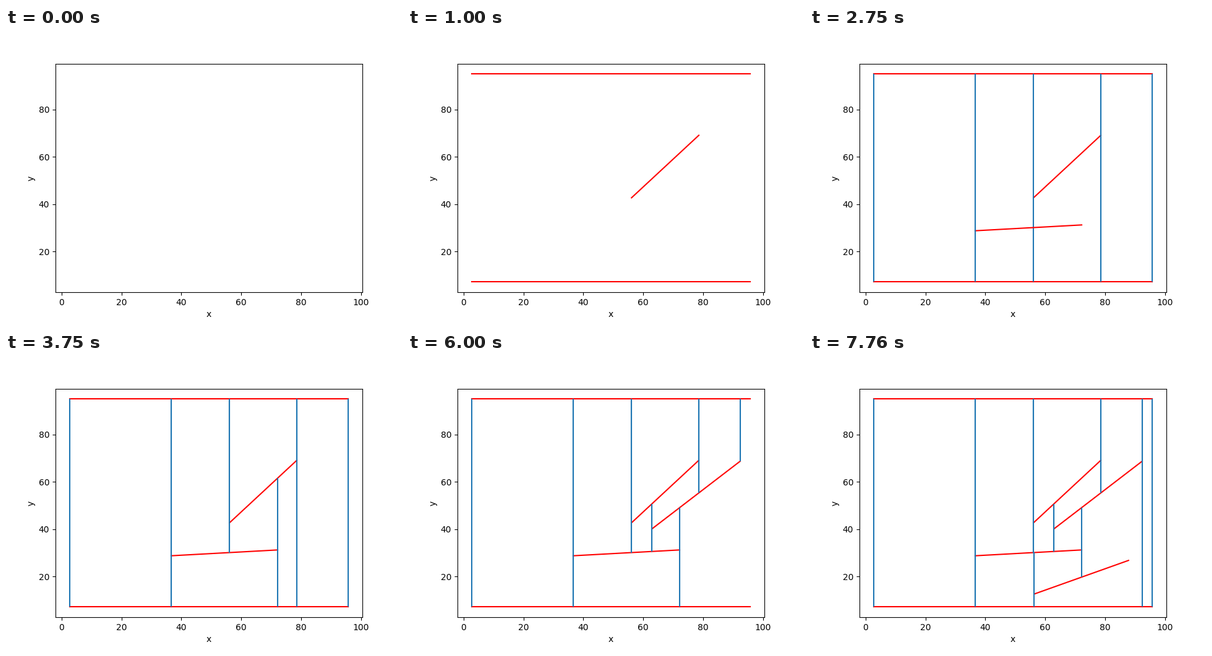
Animation of 640 by 480 pixels, one loop 8000 ms. Source, as a matplotlib script:

```python
import matplotlib.pyplot as plt
from matplotlib.animation import FuncAnimation

X0, X1 = 2.62, 95.85
Y0, Y1 = 7.22, 95.02
MARGIN = 0.05

# Segments: (left x, left y, right x, right y)
TOP = (X0, Y1, X1, Y1)
BOTTOM = (X0, Y0, X1, Y0)
S1 = (56.1, 42.75, 78.6, 69.15)
S2 = (36.6, 28.83, 72.2, 31.29)
S3 = (62.95, 40.2, 92.4, 68.75)
S4 = (56.29, 12.65, 87.86, 26.87)


def trap(left, right, upper, lower):
    return ("trap", left, right, upper, lower)


def seg(*lines):
    return ("seg", *lines)


def height(line, x):
    xa, ya, xb, yb = line
    return ya + (yb - ya) * (x - xa) / (xb - xa)


P1, Q1 = S1[0], S1[2]
P2, Q2 = S2[0], S2[2]
P3, Q3 = S3[0], S3[2]
P4 = S4[0]

whole = trap(X0, X1, TOP, BOTTOM)
left1 = trap(X0, P1, TOP, BOTTOM)
over1 = trap(P1, Q1, TOP, S1)
under1 = trap(P1, Q1, S1, BOTTOM)
right1 = trap(Q1, X1, TOP, BOTTOM)

left2 = trap(X0, P2, TOP, BOTTOM)
over2a = trap(P2, P1, TOP, S2)
over2b = trap(P1, Q2, S1, S2)
under2 = trap(P2, Q2, S2, BOTTOM)
right2 = trap(Q2, Q1, S1, BOTTOM)

left3 = trap(P1, P3, S1, S2)
over3a = trap(P3, Q1, S1, S3)
under3a = trap(P3, Q2, S3, S2)
over3b = trap(Q1, Q3, TOP, S3)
under3b = trap(Q2, Q3, S3, BOTTOM)
right3 = trap(Q3, X1, TOP, BOTTOM)

left4 = trap(P2, P4, S2, BOTTOM)
over4 = trap(P4, Q2, S2, S4)

# One step per frame; a trapezoid listed a second time is taken away.
STEPS = [
    seg(TOP, BOTTOM), whole,
    seg(S1), whole, left1, over1, under1, right1,
    seg(S2), left1, left2, over2a, under1, over2b, under2, right2,
    seg(S3), over2b, left3, over3a, right2, under3a, right1,
    over3b, under3b, right3,
    seg(S4), under2, left4, over4, under3b,
]

fig, ax = plt.subplots(figsize=(6.4, 4.8), dpi=100)
mx, my = MARGIN * (X1 - X0), MARGIN * (Y1 - Y0)
ax.set_xlim(X0 - mx, X1 + mx)
ax.set_ylim(Y0 - my, Y1 + my)
ax.set_xlabel("x")
ax.set_ylabel("y")
artists = []


def visible(n):
    shown = []
    for item in STEPS[:n]:
        if item in shown:
            shown.remove(item)
        else:
            shown.append(item)
    return shown


def draw(n):
    while artists:
        artists.pop().remove()
    for kind, *parts in visible(n):
        if kind == "seg":
            for xa, ya, xb, yb in parts:
                artists.extend(ax.plot([xa, xb], [ya, yb], color="red"))
        else:
            left, right, upper, lower = parts
            xs = [left, right]
            artists.append(ax.vlines(xs, [height(lower, x) for x in xs],
                                     [height(upper, x) for x in xs],
                                     color="C0"))
    return artists


anim = FuncAnimation(fig, draw, frames=len(STEPS) + 1, interval=250,
                     init_func=lambda: draw(0), repeat=True, repeat_delay=0)
plt.show()
```
